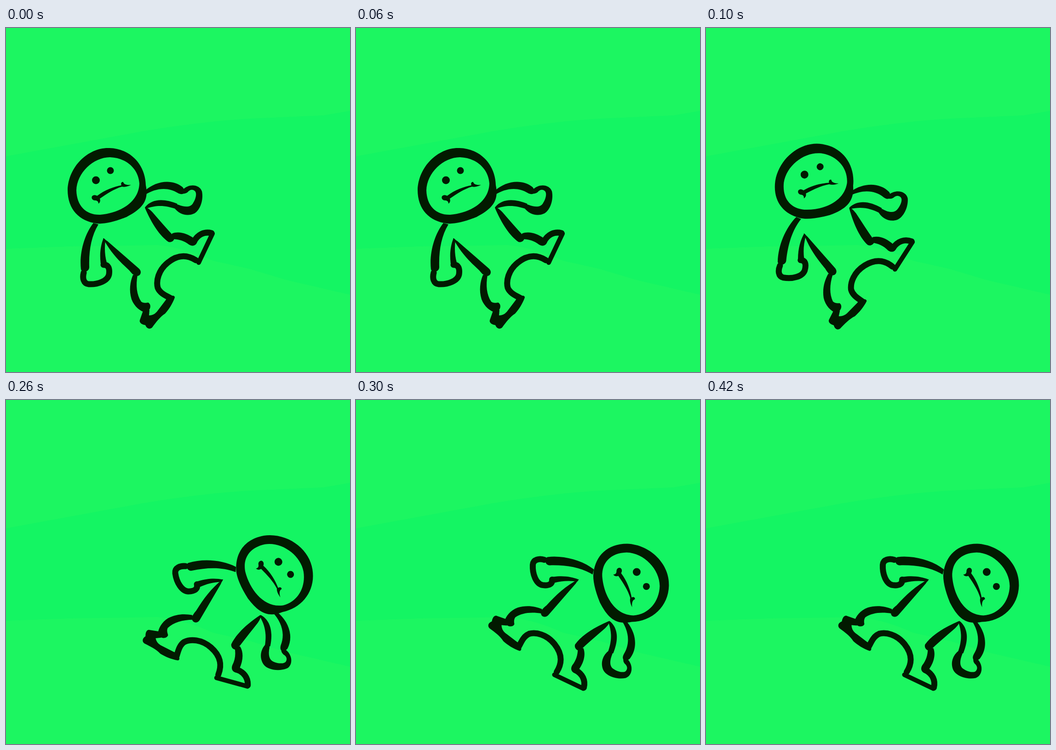
Write an HTML page that moves like this. It is 748 px wide and 748 px high and loops after 0.5 s.

```html
<!DOCTYPE html>
<html lang="en">
<head>
<meta charset="utf-8">
<title>Tumbling figure</title>
<style>
  html, body { margin: 0; width: 100%; height: 100%; overflow: hidden; background: #1cf661; }
  svg { display: block; width: 100%; height: 100%; }
  .line { fill: none; stroke: #021a00; stroke-width: 13; stroke-linecap: round; stroke-linejoin: round; }
  .thin { stroke-width: 10; }
</style>
</head>
<body>
<svg viewBox="0 0 748 748">
  <!-- faint band across the backdrop -->
  <path fill="#14f563" d="M0 279L180 246L300 224Q420 204 530 197L690 190L748 180V580L610 548L530 524L450 506Q390 478 330 472L140 475L0 480Z"/>

  <g id="figure" fill="#021a00">
    <g id="head">
      <path fill-rule="evenodd" d="M225 261C270 262 303 297 304 342C311 375 297 393 262 411C235 422 212 427 197 425C160 420 134 395 134 352C136 300 180 259 225 261Z
        M226 281C190 281 154 315 153 353C154 388 175 407 205 406C245 403 289 380 290 338C288 305 260 282 226 281Z"/>
      <circle cx="195.5" cy="331" r="8.5"/>
      <circle cx="227" cy="310" r="7.5"/>
      <path d="M187 366C190 362 195 363 198 365C215 352 235 345 251 342C249 338 251 334 255 335C256 340 262 342 272 341C262 346 256 346 252 345C235 350 220 360 204 371C206 376 204 380 201 382C201 377 198 375 194 375C188 375 185 370 187 366Z"/>
    </g>

    <g id="right-arm">
      <path d="M302 354C325 333 360 327 384 346L390 355C386 363 380 362 374 359C352 345 325 348 302 363Z"/>
      <path d="M302 390C318 370 345 371 372 382L376 390L368 393C350 387 330 383 304 393Z"/>
      <path d="M384 352C398 337 421 340 426 355C430 374 422 396 410 403C394 411 376 405 366 391L374 384C391 391 401 389 406 382C413 372 416 358 410 354C405 350 399 352 395 357Q390 361 385 360Z"/>
    </g>

    <g id="left-arm">
      <path d="M190 424L201 427C185 453 180 485 181 520C181 531 166 533 163 525C159 490 170 450 190 424Z"/>
      <path d="M212 457L216 463C214 480 215 495 219 510C222 520 208 522 206 513C203 490 206 472 212 457Z"/>
      <path class="line" d="M169 532C166 543 168 556 180 557C200 558 221 550 224 536C226 522 222 514 212 515"/>
    </g>

    <g id="torso">
      <path d="M302 391C307 390 312 394 318 400C333 417 348 435 364 452C370 459 361 468 353 465C335 452 318 428 302 391Z"/>
      <path d="M211 457C214 457 216 461 220 463L289 523C297 530 292 541 283 539C277 538 273 533 268 527C245 506 226 486 211 457Z"/>
    </g>

    <g id="right-leg">
      <path d="M361 447C376 441 394 447 408 457L416 464C414 473 406 476 398 471C388 463 376 459 361 459Z"/>
      <path class="line" d="M409 464C417 449 431 442 447 446"/>
      <path class="line thin" d="M449 447L419 510"/>
      <path class="line" d="M413 505C397 495 377 490 352 510C331 527 326 550 330 565C335 577 348 582 357 587"/>
    </g>

    <g id="left-leg">
      <path d="M276 537L286 537C282 560 284 580 294 595Q299 599 309 597C317 601 315 614 304 619C292 616 279 606 273 590C267 570 270 552 276 537Z"/>
      <path d="M367 586C362 600 354 612 346 621C335 628 326 640 318 651C313 656 306 654 303 646C296 645 289 641 291 635L298 615L312 613L311 625Q321 625 328 617L347 592Q352 582 362 582Q367 582 367 586Z"/>
    </g>
  </g>
</svg>
<script>
  const LOOP = 500;
  const PIVOT = { x: 312, y: 467.4 };
  // Each pose holds until the next one starts; turn is the 2x2 part of the transform.
  const poses = [
    { start: 0,   x: 312,   y: 467.4, turn: [1, 0, 0, 1] },
    { start: 100, x: 310.9, y: 469.2, turn: [0.988, 0.121, -0.135, 0.999] },
    { start: 200, x: 480,   y: 491,   turn: [0.183, 0.987, -0.980, 0.177] },
    { start: 300, x: 474,   y: 490.4, turn: [0, 1, -1, 0] }
  ];
  const figure = document.getElementById('figure');

  function draw(time) {
    const { x, y, turn } = poses.findLast(pose => pose.start <= time);
    figure.setAttribute('transform',
      `translate(${x} ${y}) matrix(${turn} 0 0) translate(${-PIVOT.x} ${-PIVOT.y})`);
  }

  const begin = performance.now();
  function tick() {
    draw((performance.now() - begin) % LOOP);
    requestAnimationFrame(tick);
  }
  tick();
</script>
</body>
</html>
```
